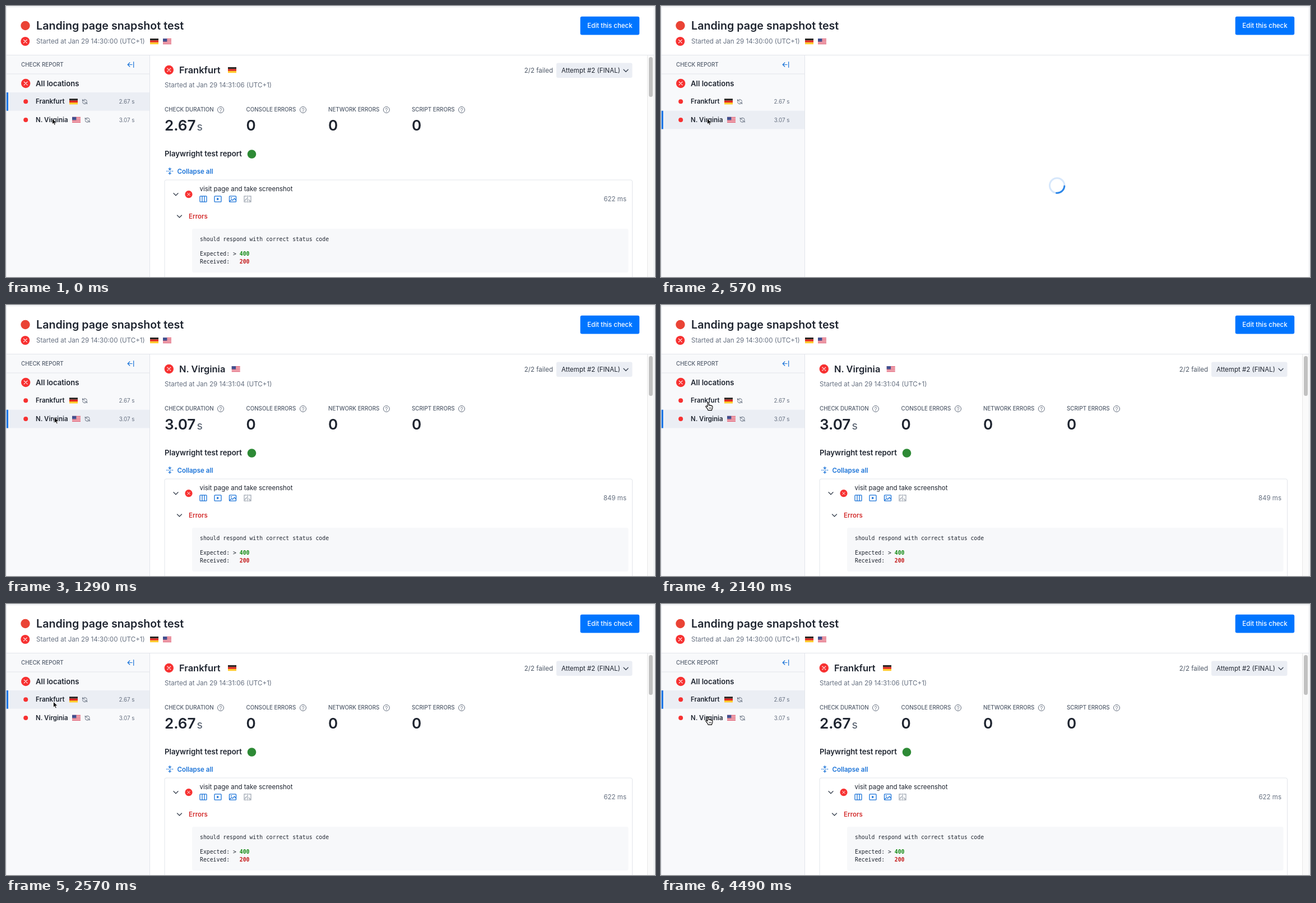
Write an HTML page that moves like this. It is 1158x483 px and loops after 4560 ms.

```html
<!DOCTYPE html>
<html lang="en">
<head>
<meta charset="utf-8">
<title>Check report</title>
<style>
html, body { margin: 0; width: 100%; height: 100%; overflow: hidden; background: #fff; }
svg { display: block; width: 100%; height: 100%; }
text { font-family: Inter, sans-serif; font-optical-sizing: none; white-space: pre; }
.mono { font-family: "DejaVu Sans Mono", monospace; }
</style>
</head>
<body>
<svg id="stage" viewBox="0 0 1158 483"></svg>
<script>
const LOOP = 4560;
const INK = '#1f2530', GRAY = '#667080', BLUE = '#0075ff', LINK = '#1a73d8';
const RED = '#f73131', BORDER = '#e2e5ea', TINT = '#ebeef4';

const text = (x, y, label, { size = 11.5, weight = 400, fill = INK, anchor = 'start', cls = '' } = {}) =>
  `<text x="${x}" y="${y}" font-size="${size}" font-weight="${weight}" fill="${fill}" text-anchor="${anchor}" class="${cls}">${label}</text>`;
const rect = (x, y, w, h, fill, r = 0, extra = '') =>
  `<rect x="${x}" y="${y}" width="${w}" height="${h}" rx="${r}" fill="${fill}" ${extra}/>`;
const dot = (x, y, r, fill) => `<circle cx="${x}" cy="${y}" r="${r}" fill="${fill}"/>`;
const line = (d, stroke, width = 1, extra = '') =>
  `<path d="${d}" fill="none" stroke="${stroke}" stroke-width="${width}" ${extra}/>`;
const at = (x, y, body) => `<g transform="translate(${x} ${y})">${body}</g>`;
const round = 'stroke-linecap="round" stroke-linejoin="round"';

const failIcon = (x, y, r) => {
  const a = r * 0.36;
  return at(x, y, dot(0, 0, r, RED) + line(`M${-a} ${-a}L${a} ${a}M${a} ${-a}L${-a} ${a}`, '#fff', r / 7.5, round));
};
const chevron = (x, y) => line(`M${x - 4} ${y - 2}l4 4 4-4`, '#394250', 1.3, round);

function germanFlag(x, y) {
  return at(x, y, ['#2a2422', '#e0261c', '#ffca2c'].map((c, i) => rect(0, i * 3.4, 15, 3.4, c)).join(''));
}
function usFlag(x, y) {
  let stripes = '';
  for (let i = 0; i < 7; i++) stripes += rect(0, i * 1.57, 15, 0.8, '#d8304a');
  return at(x, y, rect(0, 0, 15, 10.2, '#fff') + stripes + rect(0, 0, 7.4, 5.5, '#42508f'));
}

function refreshIcon(x, y) {
  const half = line('M-4-4V-1.5H0M4-.5A4 4 0 0 0-3.7-1.5', GRAY, 1, round);
  return at(x, y, half + `<g transform="rotate(180)">${half}</g>`);
}
function helpIcon(x, y) {
  return at(x, y, `<circle r="5.5" fill="none" stroke="${GRAY}"/>` +
    line('M-1.7-1.2C-1.6-3.4 1.8-3.3 1.8-1.2 1.8.1 0 .1 0 1.4', GRAY, 1, round) + dot(0, 3, 0.65, GRAY));
}
function collapseIcon(x, y) {
  return at(x, y, line('M-6 0H6', LINK, 1.2, 'stroke-dasharray="2 1.3"') +
    line('M0-6V-2.5M-2-4.3L0-2.3 2-4.3M0 6V2.5M-2 4.3L0 2.3 2 4.3', LINK, 1.2, round));
}
function attachmentIcons(y) {
  const frame = (x, inner) => at(x, y, rect(-6, -5.2, 12, 10.4, 'none', 1, `stroke="${LINK}" stroke-width="1.3"`) + inner);
  return frame(352, line('M-2-5V5M2-5V5', LINK, 1.3)) +
    frame(378, `<path d="M-1.8-2.6L2.5 0-1.8 2.6Z" fill="${LINK}"/>`) +
    frame(404.5, dot(-2.6, -2, 1.1, LINK) + line('M-5.5 4.2L-2 .8 0 2.5 3-1 5.8 2', LINK, 1.2)) +
    at(431, y, line('M-1.5-5.2H-6V5.2H-1.5M1.5-5.2H6V5.2H1.5M0-6.5V6.5M-5 3L-1.5-1M2 1L5 4', '#9ca4b0', 1.2));
}

function sidebar() {
  const row = (y, name, flag, refreshX, time) =>
    dot(35.2, y, 4, RED) + text(53, y + 4.2, name, { weight: 600 }) + flag +
    refreshIcon(refreshX, y + 0.4) +
    text(229.5, y + 3.6, time, { size: 9.8, fill: GRAY, anchor: 'end' });
  return rect(1, 88, 255, 395, '#f8f9fb') +
    text(27, 108.1, 'CHECK REPORT', { size: 9.8, weight: 500, fill: '#535d6c' }) +
    line('M217.5 104.5H225M220.8 101L217.2 104.5 220.8 108M227.7 99.5V109.5', LINK, 1.2, round) +
    line('M1 121H256', BORDER) +
    `<g id="selection">${rect(1, 154, 255, 32.7, TINT)}${rect(1, 154, 3, 32.7, '#1274e6')}</g>` +
    failIcon(35.2, 138, 8.2) + text(53, 142.5, 'All locations', { size: 13.07, weight: 600 }) +
    row(170.2, 'Frankfurt', germanFlag(113, 165.2), 140.5, '2.67 s') +
    row(202.9, 'N. Virginia', usFlag(118, 197.8), 145.2, '3.07 s');
}

function header() {
  return dot(34.5, 35, 8.2, '#ea4335') +
    text(54, 42, 'Landing page snapshot test', { size: 19.7, weight: 600 }) +
    failIcon(34.3, 63, 8) +
    text(54, 67.1, 'Started at Jan 29 14:30:00 (UTC+1)', { size: 11.6, fill: GRAY }) +
    germanFlag(257, 58) + usFlag(280, 58) +
    rect(1024.7, 18.8, 105.5, 32.7, BLUE, 3) +
    text(1077.5, 39.2, 'Edit this check', { weight: 500, fill: '#fff', anchor: 'middle' }) +
    line('M0 1.5H1158M0 87.5H1156', BORDER);
}

function locationInfo(id, name, flag, started, duration, spent) {
  return `<g id="${id}">` + text(309, 120, name, { size: 16.45, weight: 600 }) + flag +
    text(283, 145, `Started at Jan 29 ${started} (UTC+1)`, { size: 11.6, fill: GRAY }) +
    text(283, 222, duration, { size: 26.1, weight: 600 }) +
    text(1107, 348, spent, { fill: GRAY, anchor: 'end' }) + '</g>';
}

function metric(x, helpX, label, value) {
  return text(x, 188.2, label, { size: 9.8, weight: 500, fill: '#535d6c' }) + helpIcon(helpX, 185) +
    text(x, 222, value, { size: 26.1, weight: 600 });
}

function errorBlock() {
  const code = (y, label) => text(346, y, label, { size: 9.8, cls: 'mono' });
  const value = (label, fill) => `<tspan fill="${fill}" font-weight="700">${label}</tspan>`;
  return `<g id="errorBlock">${rect(332, 397, 778.5, 78, '#f7f8fa', 3)}` +
    code(419.2, 'should respond with correct status code') +
    code(445.4, 'Expected: &gt; ' + value('400', '#128a12')) +
    code(458.5, 'Received:   ' + value('200', '#c41a1a')) + '</g>';
}

function testSteps() {
  const spent = (y, label) => text(1110, y, label, { fill: GRAY, anchor: 'end' });
  return '<g id="testSteps">' + chevron(309.5, 417.5) + text(326, 421.6, 'Test Steps') +
    chevron(316, 447.2) + dot(339, 447, 6.6, '#1dd75b') +
    line('M336.3 447.2l1.9 1.9 3.5-3.7', '#fff', 1.2, round) +
    text(358.5, 451.1, 'Before Hooks') + spent(451.1, '294 ms') +
    dot(342.3, 476.6, 3.4, '#1dd75b') + text(358.5, 480.6, 'fixture: playwright') +
    spent(480.6, '1 ms') + '</g>';
}

function report() {
  return '<g id="report">' + failIcon(290.8, 114, 8.2) +
    locationInfo('frankfurt', 'Frankfurt', germanFlag(396, 109), '14:31:06', '2.67', '622 ms') +
    locationInfo('virginia', 'N. Virginia', usFlag(402.7, 109), '14:31:04', '3.07', '849 ms') +
    text(976, 119.2, '2/2 failed', { fill: '#4f5968', anchor: 'end' }) +
    rect(982, 101.5, 135.5, 26.5, TINT, 3) + text(991, 118.7, 'Attempt #2 (FINAL)') + chevron(1106, 115.3) +
    metric(283, 383, 'CHECK DURATION', '') + text(340.5, 222, 's', { size: 19.6, fill: '#4f5968' }) +
    metric(428.5, 530, 'CONSOLE ERRORS', '0') +
    metric(575, 678.8, 'NETWORK ERRORS', '0') +
    metric(724, 813, 'SCRIPT ERRORS', '0') +
    text(283, 268, 'Playwright test report', { size: 13.2, weight: 600 }) + dot(438.5, 264, 7.8, '#2d8a35') +
    collapseIcon(292.3, 294.3) + text(305.5, 298.8, 'Collapse all', { weight: 600, fill: LINK }) +
    rect(283, 310, 834.5, 190, 'none', 3, `stroke="${BORDER}"`) +
    chevron(303, 335.7) + failIcon(326, 335.7, 6.6) +
    text(345.5, 330, 'visit page and take screenshot') + attachmentIcons(344) +
    chevron(309.5, 375) + text(326, 379.2, 'Errors', { weight: 600, fill: '#d32f2f' }) +
    errorBlock() + testSteps() +
    rect(1144, 88, 12, 395, '#fafafa') + line('M1144.5 88V483', '#e8e8e8') +
    '<rect id="thumb" x="1147" y="91" width="7" rx="3.5" fill="#c1c1c1"/></g>';
}

function spinner() {
  return `<g id="spinner" transform="translate(706.7 320)"><circle r="13.2" fill="none" stroke="#d6e7fb" stroke-width="3"/>` +
    `<path id="arc" d="M0-13.2A13.2 13.2 0 0 1 13.2 0" fill="none" stroke="#2c86e8" stroke-width="3" stroke-linecap="round"/></g>`;
}

function cursors() {
  const arrow = '<path d="M0 0V10.3L2.3 8.1 3.9 11.8 5.7 11 4.1 7.4H7.4Z" fill="#000" stroke="#fff" stroke-width=".8"/>';
  const hand = '<path d="M-1.4 1C-1.4-.6.8-.6.9 1V5C1.4 4 3 4.2 3.1 5.3 3.8 4.5 5.2 4.8 5.3 5.9 6.1 5.4 7.4 5.8 7.4 7.1V9.3C7.4 11 6.2 11.5 6 13.6H-.5C-.8 11.4-3 9.7-4.4 7.4-5.2 6-3.4 5.1-2.3 6.4L-1.4 7.4Z" ' +
    'fill="#fff" stroke="#000" stroke-width="1.1" stroke-linejoin="round"/><path d="M1.4 8.5V11M3.1 8.5V11M4.8 8.5V11" stroke="#000" stroke-width=".7"/>';
  return `<g id="cursor"><g id="arrow">${arrow}</g><g id="hand">${hand}</g></g>`;
}

document.getElementById('stage').innerHTML =
  rect(0, 0, 1158, 483, '#fff') + sidebar() + header() + report() + spinner() +
  line('M.5 0V483M1156.5 0V483M256.5 88V483', BORDER) + cursors();

const ui = Object.fromEntries([...document.querySelectorAll('[id]')].map(el => [el.id, el]));
const show = (el, on) => el.setAttribute('display', on ? 'inline' : 'none');

// Pointer stops: time, x, y.
const stops = [[0, 82.5, 200.5], [570, 82.5, 200.5], [710, 86.5, 200], [1290, 86.5, 200],
  [2140, 84.5, 174], [4000, 84.5, 174], [4430, 84.5, 201.5], [LOOP, 84.5, 201.5]];

function pointerAt(t) {
  const i = Math.max(1, stops.findIndex(s => t < s[0]));
  const [t0, x0, y0] = stops[i - 1], [t1, x1, y1] = stops[i];
  const p = (t - t0) / (t1 - t0), e = p * p * (3 - 2 * p);
  return [x0 + (x1 - x0) * e, y0 + (y1 - y0) * e];
}

function render(now) {
  const time = now % LOOP;
  const step = Math.floor((time + 5) * 7 / 1000);
  const t = step * 1000 / 7;
  const virginia = step >= 1 && step < 17;
  const loading = step >= 1 && step < 5;
  const pending = step === 5 || step === 17;

  ui.selection.setAttribute('transform', `translate(0 ${virginia ? 32.7 : 0})`);
  show(ui.report, !loading);
  show(ui.spinner, loading);
  show(ui.virginia, virginia);
  show(ui.frankfurt, !virginia);
  show(ui.errorBlock, !pending);
  show(ui.testSteps, pending);
  ui.thumb.setAttribute('height', pending ? 88.5 : 71);
  ui.arc.setAttribute('transform', `rotate(${(t - 2000 / 7) * 0.36 - 8})`);

  const [x, y] = pointerAt(t);
  const overOther = virginia ? y < 187 : y > 187 && step > 1;
  show(ui.hand, overOther);
  show(ui.arrow, !overOther);
  ui.cursor.setAttribute('transform', `translate(${x} ${y})`);
}

function tick() {
  render(performance.now());
  requestAnimationFrame(tick);
}
tick();
</script>
</body>
</html>
```
